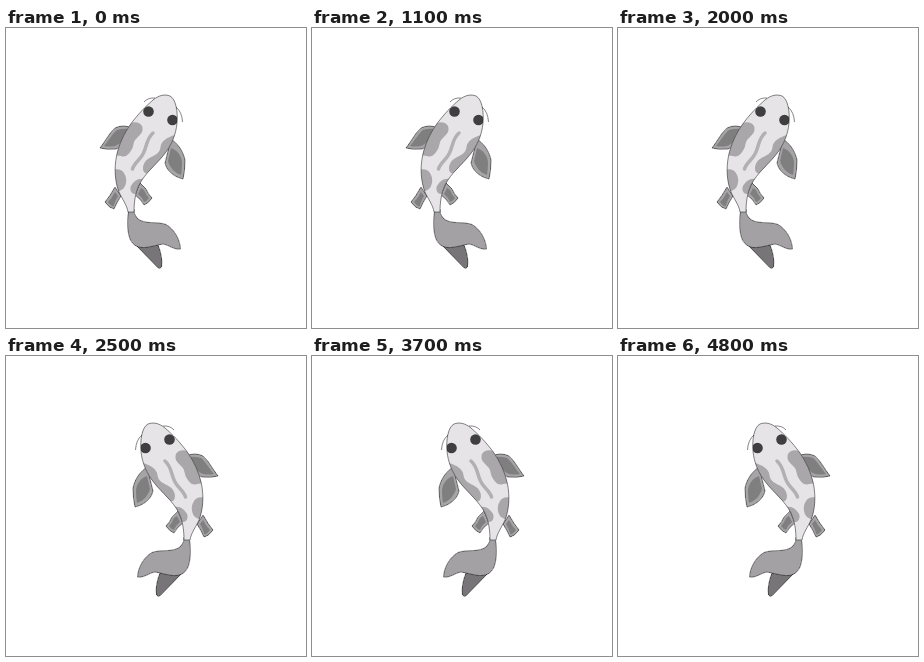
An HTML page for the animation above (5 s loop, 300 by 300 pixels).

```html
<!DOCTYPE html>
<html lang="en">
<head>
<meta charset="utf-8">
<title>Koi</title>
<style>
  html, body { margin: 0; width: 100%; height: 100%; overflow: hidden; background: #fff; }
  svg { display: block; width: 100vw; height: 100vh; }
  .line { stroke: #222; stroke-width: .55; stroke-linejoin: round; shape-rendering: crispEdges; }
  .rim { fill: #a6a4a6; }
  .web { fill: #807f80; }
  .spot { fill: #a9a7a9; }
</style>
</head>
<body>
<svg viewBox="0 0 300 300">
  <defs>
    <path id="body" d="M122 184C121 177 116 171 113 164C109 154 108 141 110.500 128C113 116 118 106 124 97C132 86 140 78 147 72C153 67 159 66 164 68C170 71 172 84 171 95C170 107 165 118 158.500 126C150 137 139 145 133 157C129 166 128 175 128 184Z"/>
    <clipPath id="inside"><use href="#body"/></clipPath>
  </defs>
  <g id="fish">
    <!-- tail -->
    <path class="line" fill="#777577" d="M128 215L151 239Q154 242 155.500 239Q157 229 152 217Z"/>
    <path class="line" fill="#a3a1a4" d="M123 181C121 191 121 203 124 211C127 218 133 220 139 219.500C145 219 151 217 157 216C163 217 168 222 174.500 221C174 211 168 201 160 196.500C151 193 138 197 131 190Q127.500 186 128 181Z"/>
    <!-- pectoral fins -->
    <path class="rim line" d="M94 120C100 112 104 104 109 100Q117 96 126 100C121 109 118 118 110 121Q101 122 94 120Z"/>
    <path class="web" d="M98 118C103 112 107 105 111 102Q117 100 123 101C119 109 115 116 109 118Q103 119 98 118Z"/>
    <path class="rim line" d="M165 111C171 115 177 122 179 132Q179 143 177 151C169 149 161 144 159 135Z"/>
    <path class="web" d="M165 120C171 122 176 128 176 135Q176 141 175 147C169 145 164 140 162 133Z"/>
    <!-- pelvic fins -->
    <path class="rim line" d="M109 159Q104 168 99 174Q103 180 108 181Q111 174 115 168Z"/>
    <path class="web" d="M109 164Q106 170 102 174Q105 178 107.500 178.500Q109 173 112 168Z"/>
    <path class="rim line" d="M134 155L140 161Q142 166 146 170Q143 175 138 177Q135 171 129 167Z"/>
    <path class="web" d="M135 160L138 162Q140 167 143 170Q141 173 138 174Q136 169 132 166Z"/>
    <!-- body and markings -->
    <use href="#body" fill="#e6e4e7"/>
    <g clip-path="url(#inside)">
      <path class="spot" d="M121 98C126 92 134 94 136 98C138 104 134 107 131 110C127 113 128 117 126 121C123 126 120 130 115 128L106 127Z"/>
      <path class="spot" d="M169 107C162 109 155 113 154.500 119C154 126 148 127 142 131C137 134 136 141 138 144C140 147 145 145 156 138Z"/>
      <path class="spot" d="M106 142C112 140 117 142 118.500 146C121 150 121 157 117 161L108 166Z"/>
      <path class="spot" d="M138 151C131 150 128 154 125.500 157C123 161 125 166 129 166L138 165Z"/>
      <path d="M147 105C140 111 141 119 137 126C134 132 128 135 126.500 141" fill="none" stroke="#b2b0b2" stroke-width="3.500" stroke-linecap="round"/>
      <g fill="#403f40">
        <circle cx="142.500" cy="83.500" r="5.300"/>
        <circle cx="166.500" cy="92" r="5.300"/>
      </g>
    </g>
    <use href="#body" class="line" fill="none"/>
    <!-- whiskers -->
    <path class="line" fill="none" d="M149 70Q142 69.500 138 74M170 79Q176 84 176.500 94"/>
  </g>
</svg>
<script>
  const fish = document.getElementById('fish');
  const AXIS = 153, HOLD = 500;

  function draw() {
    const mirrored = Math.floor(performance.now() / HOLD) % 2;
    fish.setAttribute('transform', mirrored ? `matrix(-1 0 0 1 ${2 * AXIS} 0)` : '');
    requestAnimationFrame(draw);
  }
  draw();
</script>
</body>
</html>
```
